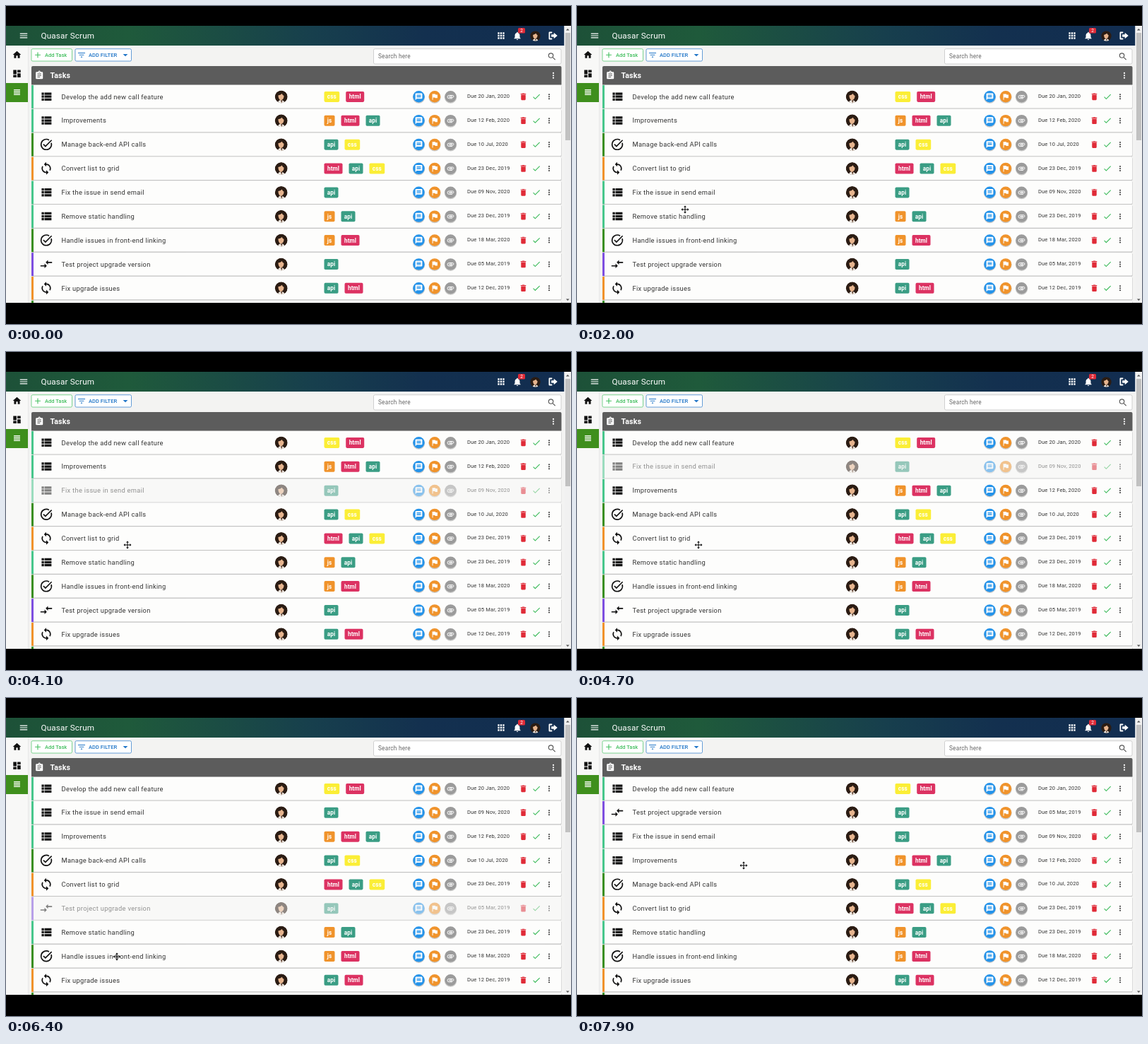
An HTML page for the animation above (8 s loop, 800 px wide and 450 px high).

```html
<!DOCTYPE html>
<html lang="en">
<head>
<meta charset="utf-8">
<title>Task list</title>
<style>
  html, body { margin: 0; width: 100%; height: 100%; overflow: hidden; background: #000; }
  svg { display: block; width: 800px; height: 450px; }
  text { font-family: Roboto, "Noto Sans", sans-serif; white-space: pre; }
</style>
</head>
<body>
<svg id="stage" viewBox="0 0 800 450" xmlns="http://www.w3.org/2000/svg">
  <defs>
    <linearGradient id="bar">
      <stop offset="0" stop-color="#1d5138"/>
      <stop offset=".22" stop-color="#1f5a3b"/>
      <stop offset=".55" stop-color="#173f4d"/>
      <stop offset=".75" stop-color="#13304f"/>
      <stop offset="1" stop-color="#122d50"/>
    </linearGradient>
    <clipPath id="view"><rect y="28" width="800" height="392"/></clipPath>
    <clipPath id="disc"><circle r="9"/></clipPath>
  </defs>
  <rect width="800" height="450"/>
  <g id="app" clip-path="url(#view)"></g>
</svg>
<script>
const LOOP = 8000, STEP = 100, PITCH = 33.87, TOP = 111.8;
const RED = '#e02b38', GREEN = '#3a8f1d', TEAL = '#48c78c', ORANGE = '#f0932b',
      BLUE = '#2493ea', PURPLE = '#7e4fe0', GREY = '#9b9b9b', INK = '#333';

// Icons on a 24 unit grid; those in LINES are stroked.
const ICONS = {
  menu: 'M3 6h18v2H3zM3 11h18v2H3zM3 16h18v2H3z',
  home: 'M10 20v-6h4v6h5v-8h3L12 3 2 12h3v8z',
  board: 'M3 3h8v10H3zM3 15h8v6H3zM13 3h8v6h-8zM13 11h8v10h-8z',
  lines: 'M4 5h16v2H4zM4 9h16v2H4zM4 13h16v2H4zM4 17h16v2H4z',
  list: 'M4 5h4v4H4zM4 10h4v4H4zM4 15h4v4H4zM9 5h12v4H9zM9 10h12v4H9zM9 15h12v4H9z',
  done: 'M20.6 9.2A9 9 0 1 1 16.9 4.4M7 11.7l3.6 3.5L21.3 4.5',
  swap: 'M9 14H2v2h7v3l4-4-4-4zM15 13v-3h7V8h-7V5l-4 4z',
  chat: 'M4 2h16q2 0 2 2v12q0 2-2 2H6l-4 4V4q0-2 2-2zM6 6v2h12V6zM6 9v2h12V9zM6 12v2h12v-2z',
  flag: 'M14.4 6 14 4H5v17h2v-7h5.6l.4 2h7V6z',
  clip: 'M17 17H7.5a4.5 4.5 0 0 1 0-9H18a3 3 0 0 1 0 6H9.5a1.5 1.5 0 0 1 0-3H17',
  trash: 'M6 7h12v12q0 2-2 2H8q-2 0-2-2zM19 4h-3.5l-1-1h-5l-1 1H5v2h14z',
  check: 'M9 16.2 4.8 12l-1.4 1.4L9 19 21 7l-1.4-1.4z',
  dots: 'M12 6h.01M12 12h.01M12 18h.01',
  find: 'M14.5 14.5 20 20M15 9.5a5.5 5.5 0 1 1-11 0a5.5 5.5 0 1 1 11 0',
  board2: 'M5 3h4a3 3 0 0 1 6 0h4q2 0 2 2v14q0 2-2 2H5q-2 0-2-2V5q0-2 2-2zM7 7v2h10V7zM7 11v2h10v-2zM7 15v2h7v-2zM11 3v1.6h2V3z',
  bell: 'M10 20h4a2 2 0 0 1-4 0zM18 16v-5c0-3-1.6-5.6-4.5-6.3V4a1.5 1.5 0 0 0-3 0v.7C7.6 5.4 6 8 6 11v5l-2 2v1h16v-1z',
  filter: 'M3 6h18v2H3zM6 11h12v2H6zM10 16h4v2h-4z',
  plus: 'M19 13h-6v6h-2v-6H5v-2h6V5h2v6h6z',
  apps: 'M4 4h4v4H4zM10 4h4v4h-4zM16 4h4v4h-4zM4 10h4v4H4zM10 10h4v4h-4zM16 10h4v4h-4zM4 16h4v4H4zM10 16h4v4h-4zM16 16h4v4h-4z',
  exit: 'M10 3H4q-2 0-2 2v14q0 2 2 2h6v-3H5V6h5zM14 5v4H8v6h6v4l8.5-7z',
  down: 'M6 9.5h12l-6 6z',
  up: 'M6 14.5h12l-6-6z',
  move: 'M12 1l4 4h-3v6h6V8l4 4-4 4v-3h-6v6h3l-4 4-4-4h3v-6H5v3l-4-4 4-4v3h6V5H8z'
};
ICONS.sync = 'M12 1 8 5l4 4V6a6 6 0 0 1 5.3 8.8l1.5 1.5A8 8 0 0 0 12 4z' +
             'M12 23l4-4-4-4v3a6 6 0 0 1-5.3-8.8L5.2 7.7A8 8 0 0 0 12 20z';
const LINES = { done: 2, clip: 2, dots: 4, find: 2 };

const TAGS = {
  css: ['#fbee36', 21.7], html: ['#dc3262', 26], api: ['#3a9d84', 20], js: [ORANGE, 15]
};
const KINDS = { list: TEAL, done: GREEN, sync: ORANGE, swap: PURPLE };
const TASKS = [
  ['list', 'Develop the add new call feature', 'css html', '20 Jan, 2020'],
  ['list', 'Improvements', 'js html api', '12 Feb, 2020'],
  ['done', 'Manage back-end API calls', 'api css', '10 Jul, 2020'],
  ['sync', 'Convert list to grid', 'html api css', '23 Dec, 2019'],
  ['list', 'Fix the issue in send email', 'api', '09 Nov, 2020'],
  ['list', 'Remove static handling', 'js api', '23 Dec, 2019'],
  ['done', 'Handle issues in front-end linking', 'js html', '18 Mar, 2020'],
  ['swap', 'Test project upgrade version', 'api', '05 Mar, 2019'],
  ['sync', 'Fix upgrade issues', 'api html', '12 Dec, 2019'],
  ['done', '', '', '']
];

// Each drag: task, pick-up and drop times, then [time, slot] moves.
const DRAGS = [
  { task: 4, from: 3500, to: 5100, moves: [[3700, 3], [4100, 2], [4500, 1]] },
  { task: 7, from: 6200, to: 7700,
    moves: [[6300, 6], [6400, 5], [6600, 4], [6700, 3], [6900, 2], [7200, 1]] }
];
// Pointer path: time, x, y
const PATH = [
  [700, 152, 412], [1200, 146, 309], [2000, 153, 288], [3000, 166, 270], [3500, 172, 273],
  [5099, 172, 273], [5100, 166, 172], [5300, 164, 200], [5900, 153, 367], [6200, 157, 366],
  [7699, 157, 366], [7700, 190, 176], [7900, 236, 237]
];

function add(parent, tag, attrs, content) {
  const el = document.createElementNS('http://www.w3.org/2000/svg', tag);
  for (const k in attrs) el.setAttribute(k, attrs[k]);
  if (content) el.textContent = content;
  return parent.appendChild(el);
}
function box(p, x, y, width, height, fill, extra) {
  return add(p, 'rect', { x, y, width, height, fill, ...extra });
}
function label(p, x, y, size, fill, str, spacing = 0, weight = 400, anchor = 'start') {
  return add(p, 'text', {
    x, y, fill, 'font-size': size, 'font-weight': weight,
    'letter-spacing': spacing * size, 'text-anchor': anchor
  }, str);
}
function icon(p, name, x, y, scale, color) {
  const w = LINES[name];
  const paint = w
    ? { fill: 'none', stroke: color, 'stroke-width': w, 'stroke-linecap': name === 'dots' ? 'round' : 'butt' }
    : { fill: color, 'fill-rule': 'evenodd' };
  return add(p, 'path', {
    d: ICONS[name], transform: `translate(${x} ${y}) scale(${scale}) translate(-12 -12)`, ...paint
  });
}
function avatar(p, x, y, r) {
  const g = add(p, 'g', { transform: `translate(${x} ${y}) scale(${r / 9})`, 'clip-path': 'url(#disc)' });
  add(g, 'circle', { r: 9, fill: '#2b1c13' });
  add(g, 'path', { d: 'M-5 9q1-4 4-4.4l3 .4q2.500 1 3 4z', fill: '#efe9e2' });
  add(g, 'path', { d: 'M-4.300-2Q-1-2.500 1-4.500 2-2 3.800-1.500 4 3.500-.5 5-4 4-4.300-2z', fill: '#e6b48e' });
  add(g, 'path', { d: 'M-.8 5 .6 9 1.700 5z', fill: '#5b3a28' });
}

const app = document.getElementById('app');

function drawPage() {
  box(app, 0, 28, 800, 392, '#f3f3f2');
  box(app, 0, 56, 31, 364, '#f8f8f7');
  box(app, 31, 56, .6, 364, '#e2e2e2');
  box(app, 0, 28, 790.5, 28, 'url(#bar)');

  icon(app, 'menu', 25, 42, .58, '#fff');
  label(app, 49.500, 46.300, 11.72, '#fff', 'Quasar Scrum', .0125);
  icon(app, 'apps', 701, 42, .58, '#fff');
  icon(app, 'bell', 724, 42.300, .58, '#fff');
  box(app, 725, 31, 10, 7.500, RED, { rx: 1.500 });
  label(app, 730, 37.200, 6.500, '#fff', '2', 0, 400, 'middle');
  avatar(app, 749.500, 42.500, 7.300);
  icon(app, 'exit', 774.500, 42, .6, '#fff');

  box(app, 0, 109, 31, 27, '#3f8f1d');
  icon(app, 'home', 15.500, 69, .58, '#111');
  icon(app, 'board', 15.500, 95.800, .58, '#111');
  icon(app, 'lines', 15.500, 122, .56, '#fff');

  box(app, 36, 60.700, 57.500, 17.300, '#fff', { rx: 1.800, stroke: '#5cca74', 'stroke-width': .8 });
  icon(app, 'plus', 45, 69.300, .56, '#43bf5f');
  label(app, 55, 72.200, 7.600, '#43bf5f', 'Add Task', 0, 500);
  box(app, 98, 60.700, 79.500, 17.300, '#fff', { rx: 1.800, stroke: '#3f86cf', 'stroke-width': .8 });
  icon(app, 'filter', 107, 69.300, .56, '#1f75c8');
  label(app, 117, 72.200, 7.600, '#1f75c8', 'ADD FILTER', 0, 500);
  icon(app, 'down', 169, 69.300, .56, '#1f75c8');

  box(app, 520.500, 60.700, 265.500, 21.300, '#fff', { rx: 2, stroke: '#c6c6c6', 'stroke-width': .8 });
  label(app, 527, 74.200, 8.200, '#666', 'Search here', .03);
  icon(app, 'find', 773, 71.500, .58, '#555');

  add(app, 'path', { d: 'M36 111.500V87q0-2 2-2h746.500q2 0 2 2v24.500z', fill: '#5c5c5c' });
  icon(app, 'board2', 47.200, 98.300, .56, '#fff');
  label(app, 62.500, 102, 10.6, '#fff', 'Tasks', .01, 700);
  icon(app, 'dots', 775, 98.300, .56, '#fff');
}

function drawRow([kind, name, tags, due]) {
  const g = add(app, 'g', {}), mid = 16.400;
  box(g, 36, .8, 750.500, 33, '#c4c4c4', { rx: 1.500 });
  box(g, 36.500, .3, 749.500, 32.300, '#fdfdfc', { rx: 1.500 });
  box(g, 36, .3, 3, 32.800, KINDS[kind]);
  if (!name) return g;

  icon(g, kind, 57, mid, .82, '#111');
  label(g, 78.500, mid + 3.400, 9.37, INK, name, .03125);
  avatar(g, 389.700, mid + .2, 9);

  let x = 450.500;
  for (const tag of tags.split(' ')) {
    const [color, w] = TAGS[tag];
    box(g, x, mid - 7.300, w, 15, color, { rx: 1.800 });
    label(g, x + w / 2, mid + 3.100, 8.2, '#fff', tag, .015, 700, 'middle');
    x += w + 9;
  }
  [['chat', BLUE], ['flag', ORANGE], ['clip', GREY]].forEach(([pic, color], i) => {
    const cx = 584.500 + 22.500 * i;
    add(g, 'circle', { cx, cy: mid + 1, r: 8.600, fill: '#000', opacity: .2 });
    add(g, 'circle', { cx, cy: mid + .1, r: 8.200, fill: color });
    icon(g, pic, cx, mid + .2, .49, '#fff');
  });
  label(g, 653, mid + 1.700, 7.500, INK, 'Due ' + due, .02);
  icon(g, 'trash', 732.500, mid + .1, .54, RED);
  icon(g, 'check', 751, mid + .1, .56, '#3dbb5b');
  icon(g, 'dots', 769, mid + .1, .5, INK);
  return g;
}

function drawScrollbar() {
  box(app, 790.500, 28, 9.500, 392, '#f1f1f1');
  box(app, 792, 38, 7, 152, '#c1c1c1');
  icon(app, 'up', 795.300, 33.500, .4, '#555');
  icon(app, 'down', 795.300, 415.500, .4, '#555');
}

drawPage();
const rows = TASKS.map(drawRow);
drawScrollbar();
const pointer = add(app, 'g', {});
const shape = icon(pointer, 'move', 0, 0, .49, '#000');
for (const [k, v] of [['stroke', '#fff'], ['stroke-width', 2.2], ['paint-order', 'stroke']]) {
  shape.setAttribute(k, v);
}

function pointerAt(t) {
  if (t < PATH[0][0]) return null;
  const n = PATH.findIndex(p => p[0] > t);
  if (n < 0) return PATH[PATH.length - 1].slice(1);
  const a = PATH[n - 1], b = PATH[n], k = (t - a[0]) / (b[0] - a[0]);
  return [a[1] + (b[1] - a[1]) * k, a[2] + (b[2] - a[2]) * k];
}

function render(time) {
  const t = Math.floor((time % LOOP) / STEP) * STEP;
  const order = TASKS.map((_, i) => i);
  rows.forEach(r => r.setAttribute('opacity', 1));
  for (const d of DRAGS) {
    const move = d.moves.filter(m => m[0] <= t).pop();
    if (move) {
      order.splice(order.indexOf(d.task), 1);
      order.splice(move[1], 0, d.task);
    }
    if (t >= d.from && t < d.to) rows[d.task].setAttribute('opacity', .5);
  }
  order.forEach((id, slot) =>
    rows[id].setAttribute('transform', `translate(0 ${TOP + PITCH * slot})`));

  const at = pointerAt(t);
  pointer.setAttribute('visibility', at ? 'visible' : 'hidden');
  if (at) pointer.setAttribute('transform', `translate(${at})`);
}

const start = performance.now();
function tick() {
  render(performance.now() - start);
  requestAnimationFrame(tick);
}
tick();
</script>
</body>
</html>
```
